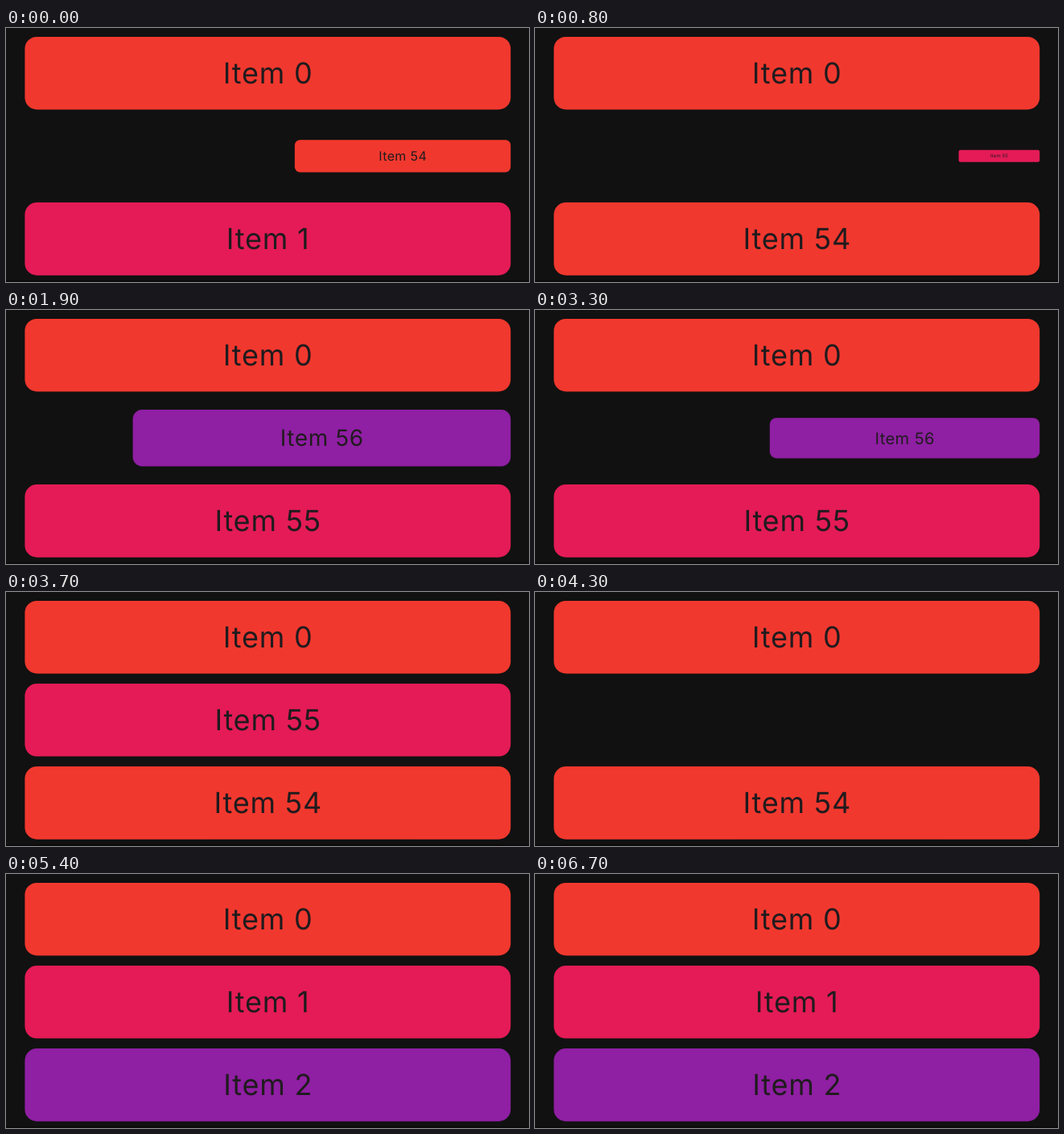
Recreate the animation shown at these times as an HTML page. Size 650 px wide and 316 px high, loop 6.8 s.

```html
<!DOCTYPE html>
<html lang="en">
<head>
<meta charset="utf-8">
<title>Animated list</title>
<style>
  html, body { margin: 0; width: 100%; height: 100%; overflow: hidden; background: #111; }
  svg { display: block; }
  text {
    font: 400 36px Inter, Roboto, sans-serif;
    letter-spacing: 0.8px;
    text-anchor: middle;
    text-rendering: geometricPrecision;
    fill: #201b1e;
  }
</style>
</head>
<body>
<svg id="stage" width="650" height="316" viewBox="0 0 650 316">
  <rect width="650" height="316" fill="#111"/>
  <rect y="314" width="650" height="2" fill="#0b0b0b"/>
</svg>
<script>
const LOOP = 6800, TICK = 100, DURATION = 300;
const RIGHT = 627.2, WIDTH = 603.8, HEIGHT = 90.6, TOP = 10.9, PITCH = 103.1;
const COLORS = ['#f1382e', '#e41b56', '#8f1fa3'];

// from: when the row applies; start, dir: when the middle card grows (1) or shrinks (-1)
const PHASES = [
  { from: 0,    middle: 54, last: 1,  start: -400 / 3,  dir: 1 },
  { from: 750,  middle: 55, last: 54, start: 750,       dir: 1 },
  { from: 1667, middle: 56, last: 55, start: 5000 / 3,  dir: 1 },
  { from: 2500, middle: 56, last: 55, start: 9500 / 3,  dir: -1 },
  { from: 3484, middle: 55, last: 54, start: 4000,      dir: -1 },
  { from: 4317, middle: 54, last: 1,  start: 14350 / 3, dir: -1 },
  { from: 5100, middle: 1,  last: 2,  start: 0,         dir: 1 },
];

const stage = document.getElementById('stage');

function add(parent, tag, attrs = {}) {
  const el = document.createElementNS('http://www.w3.org/2000/svg', tag);
  for (const key in attrs) el.setAttribute(key, attrs[key]);
  return parent.appendChild(el);
}

// Each card is drawn around its right-centre point, which is also its scale origin.
function makeCard(slot) {
  const group = add(stage, 'g');
  const box = add(group, 'rect', { x: -WIDTH, y: -HEIGHT / 2, width: WIDTH, height: HEIGHT, rx: 15 });
  const label = add(group, 'text', { x: -WIDTH / 2 + 0.4, y: 13 });
  const centre = TOP + slot * PITCH + HEIGHT / 2;
  return (id, scale = 1) => {
    group.setAttribute('transform', `translate(${RIGHT} ${centre}) scale(${scale})`);
    box.setAttribute('fill', COLORS[id % COLORS.length]);
    label.textContent = `Item ${id}`;
  };
}

const [showFirst, showMiddle, showLast] = [0, 1, 2].map(makeCard);
showFirst(0);

function draw(time) {
  const phase = PHASES.findLast(p => p.from <= time);
  const progress = Math.min(1, Math.max(0, (time - phase.start) / DURATION));
  showMiddle(phase.middle, phase.dir > 0 ? progress : 1 - progress);
  showLast(phase.last);
}

const origin = performance.now();
function frame() {
  const elapsed = (performance.now() - origin) % LOOP;
  draw(Math.floor(elapsed / TICK) * TICK);
  requestAnimationFrame(frame);
}
frame();
</script>
</body>
</html>
```
